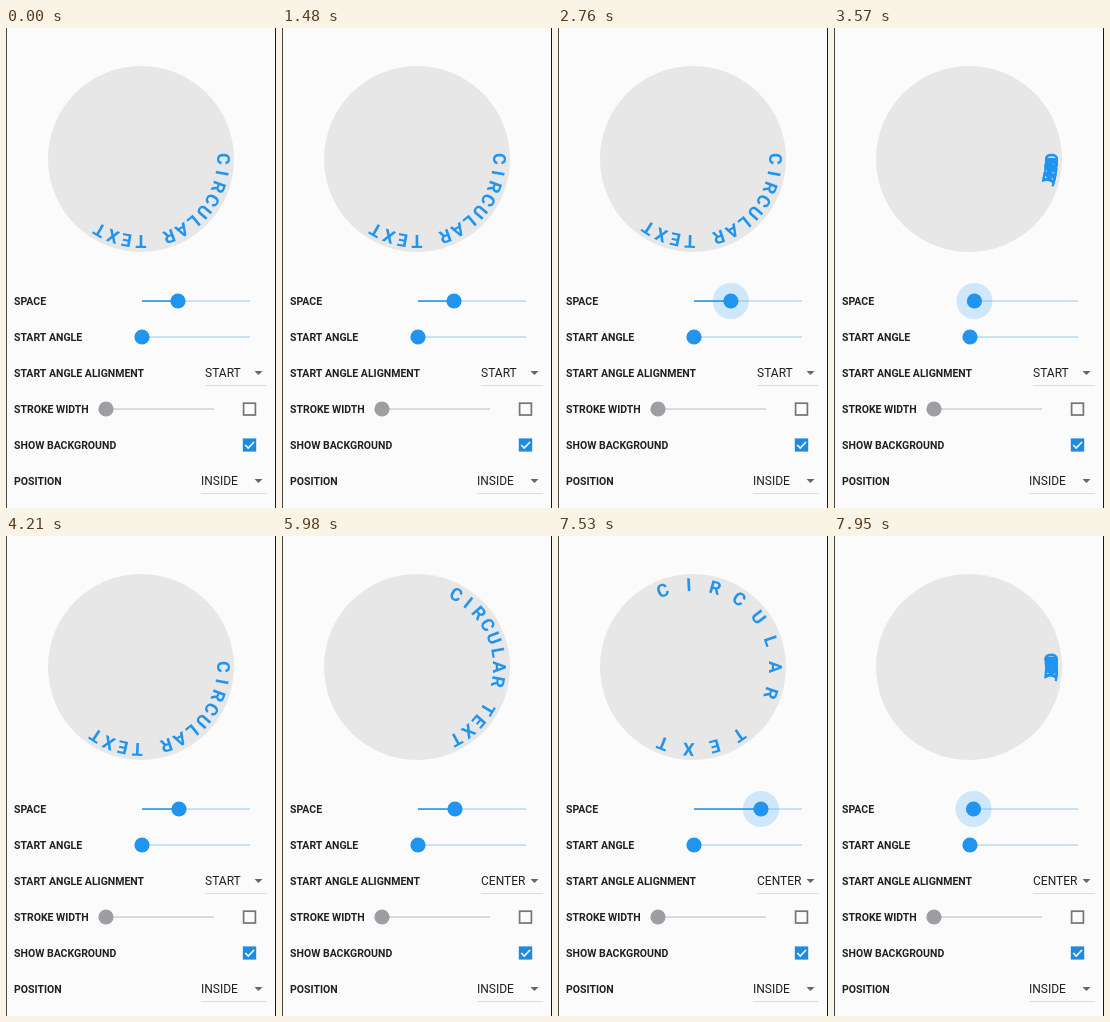
Write an HTML page with a canvas that moves like this. It is 270x480 px and loops after 7990 ms.

```html
<!DOCTYPE html>
<html lang="en">
<head>
<meta charset="utf-8">
<title>Circular text</title>
<style>
html, body { margin: 0; width: 100%; height: 100%; overflow: hidden; background: #fbfbfb; }
canvas { display: block; width: 270px; height: 480px; }
</style>
</head>
<body>
<canvas id="stage"></canvas>
<script>
const LOOP = 7990;
const PAPER = '#fbfbfb', DISC = '#e7e7e8', BLUE = '#2094ee', GREY = '#9d9da2', INK = '#202022';
const FONT = 'Roboto, "Open Sans", sans-serif';
const MIN_X = 136, MAX_X = 244, MAX_STEP = 30;

const canvas = document.getElementById('stage');
const ctx = canvas.getContext('2d');
const ratio = window.devicePixelRatio || 1;
canvas.width = 270 * ratio;
canvas.height = 480 * ratio;

// [time, value] pairs
const thumbKeys = [[1540, 172], [2050, 232], [2170, 244], [2450, 244], [2760, 173], [3020, 136],
  [3510, 136], [4020, 173], [6470, 173], [6980, 244], [7260, 244], [7950, 139.5]];
const rippleKeys = [[1480, 0], [1600, 1], [4010, 1], [4200, 0], [6400, 0], [6520, 1]];
const popupKeys = [[4690, 0], [4950, 1], [5340, 1], [5510, 0]];

function track(keys, t) {
  if (t <= keys[0][0]) return keys[0][1];
  for (let i = 1; i < keys.length; i++) {
    const [t0, v0] = keys[i - 1], [t1, v1] = keys[i];
    if (t <= t1) return v0 + (v1 - v0) * (t - t0) / (t1 - t0);
  }
  return keys[keys.length - 1][1];
}

function dot(x, y, r, color) {
  ctx.fillStyle = color;
  ctx.beginPath();
  ctx.arc(x, y, r, 0, Math.PI * 2);
  ctx.fill();
}

function box(x, y, w, h, color) {
  ctx.fillStyle = color;
  ctx.fillRect(x, y, w, h);
}

function write(text, x, y, font, color = INK) {
  ctx.font = font + ' ' + FONT;
  ctx.fillStyle = color;
  ctx.fillText(text, x, y);
}

const label = (text, y) => write(text, 8, y + 3.8, 'bold 10.5px');
const option = (text, x, y) => write(text, x, y + 4.3, '12px');

function drawCircle(step, centered) {
  dot(135, 131, 93, DISC);
  const text = 'CIRCULAR TEXT';
  const start = centered ? -step * (text.length - 1) / 2 : 0;
  ctx.textAlign = 'center';
  [...text].forEach((letter, i) => {
    ctx.save();
    ctx.translate(135, 131);
    ctx.rotate((start + i * step + 90) * Math.PI / 180);
    write(letter, 0, -76, 'bold 18px', BLUE);
    ctx.restore();
  });
  ctx.textAlign = 'left';
}

function slider(left, x, y, color, press = 0) {
  box(left, y - .6, 108, 1.3, color === GREY ? '#c9c9cd' : '#b3d3f2');
  if (x > left) box(left, y - .7, x - left, 1.5, BLUE);
  if (press > 0) {
    ctx.globalAlpha = press;
    dot(x, y, 9 + 9 * press, 'rgba(33, 150, 243, .2)');
    ctx.globalAlpha = 1;
  }
  dot(x, y, 7.6, color);
}

function spinner(text, x, y) {
  option(text, x, y);
  ctx.fillStyle = '#66666a';
  ctx.beginPath();
  ctx.moveTo(248.5, y - 2);
  ctx.lineTo(256.5, y - 2);
  ctx.lineTo(252.5, y + 2);
  ctx.fill();
  box(x, y + 12, 261 - x, .8, '#d5d5d9');
}

function checkbox(y, checked) {
  if (checked) {
    box(236.8, y - 6.6, 13.4, 13.2, '#1f8be0');
    ctx.strokeStyle = PAPER;
    ctx.lineWidth = 1.6;
    ctx.beginPath();
    ctx.moveTo(239.3, y);
    ctx.lineTo(242.2, y + 3);
    ctx.lineTo(248, y - 3);
    ctx.stroke();
  } else {
    ctx.strokeStyle = '#757579';
    ctx.lineWidth = 1.7;
    ctx.strokeRect(237.6, y - 5.8, 11.8, 11.8);
  }
}

function popup(t) {
  const open = track(popupKeys, t);
  if (open <= 0) return;
  const closing = t > 5340;
  const height = closing ? 108 : 108 * (1 - (1 - open) ** 2);
  ctx.save();
  ctx.globalAlpha = closing ? open : Math.min(1, open * 2);
  ctx.shadowColor = 'rgba(0, 0, 0, .3)';
  ctx.shadowBlur = 10 * ratio;
  ctx.shadowOffsetY = 4 * ratio;
  box(187, 327, 77, height, PAPER);
  ctx.shadowColor = 'transparent';
  ctx.beginPath();
  ctx.rect(187, 327, 77, height);
  ctx.clip();
  if (t > 5130) box(187, 363, 77, 36, '#e4e4e6');
  ['START', 'CENTER', 'END'].forEach((name, i) => option(name, 199, 345 + 36 * i));
  ctx.restore();
}

function draw(t) {
  ctx.setTransform(ratio, 0, 0, ratio, 0, 0);
  box(0, 0, 270, 480, PAPER);
  box(0, 0, 1, 480, '#484848');
  box(269, 0, 1, 480, '#181818');

  const x = track(thumbKeys, t);
  const centered = t >= 5340;
  drawCircle((x - MIN_X) / (MAX_X - MIN_X) * MAX_STEP, centered);

  label('SPACE', 273);
  slider(MIN_X, x, 273, BLUE, track(rippleKeys, t));
  label('START ANGLE', 309);
  slider(MIN_X, MIN_X, 309, BLUE);
  label('START ANGLE ALIGNMENT', 345);
  spinner(centered ? 'CENTER' : 'START', 199, 345);
  label('STROKE WIDTH', 381);
  slider(100, 100, 381, GREY);
  checkbox(381, false);
  label('SHOW BACKGROUND', 417);
  checkbox(417, true);
  label('POSITION', 453);
  spinner('INSIDE', 195, 453);
  popup(t);
}

function frame() {
  draw(performance.now() % LOOP);
  requestAnimationFrame(frame);
}
frame();
</script>
</body>
</html>
```
